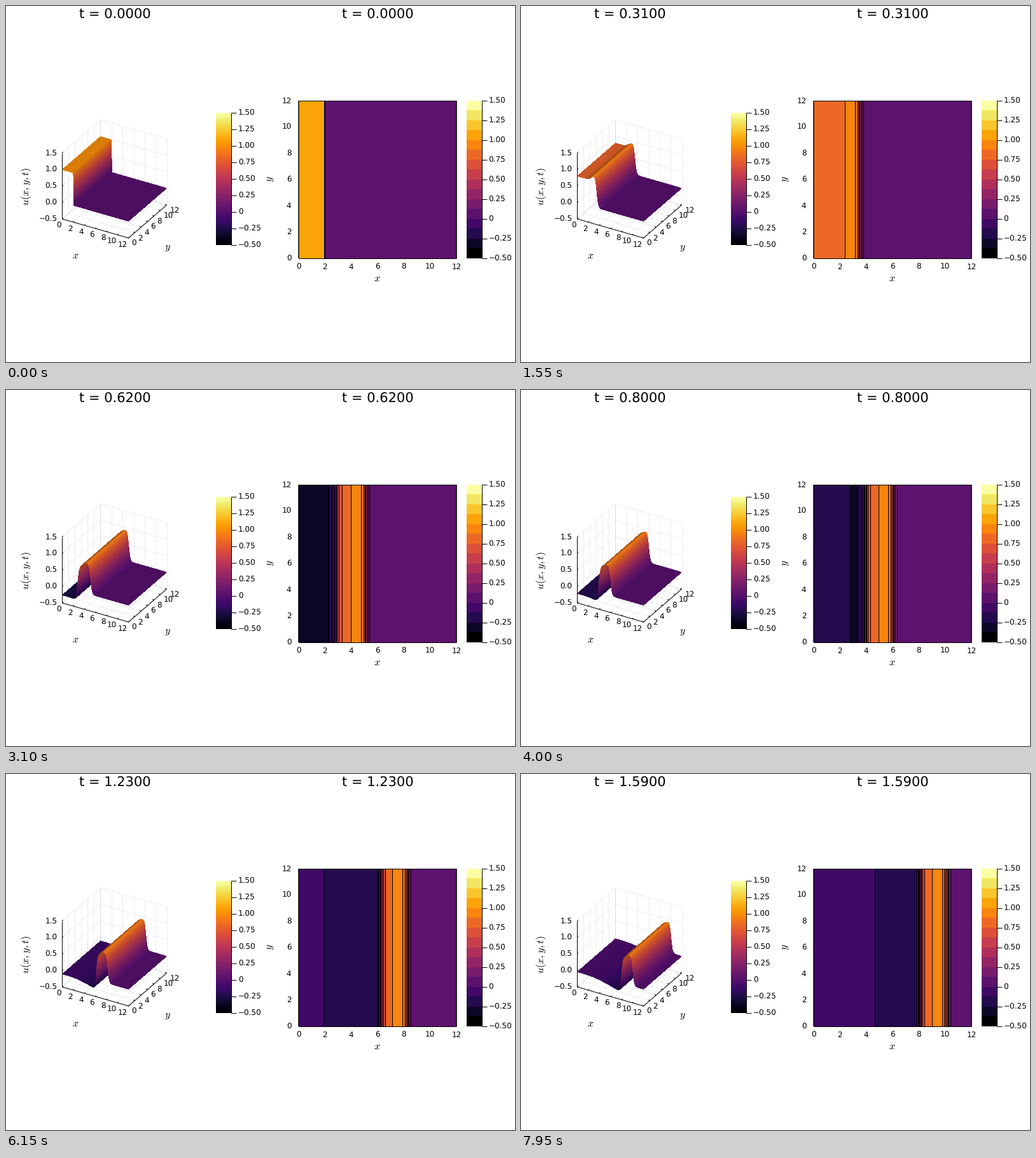
A matplotlib script that plays this animation: 800 by 560 pixels, repeating every 8000 ms.

```python
import numpy as np
import matplotlib.pyplot as plt
from matplotlib.animation import FuncAnimation
from matplotlib.collections import LineCollection, PolyCollection

plt.rcParams["font.family"] = "DejaVu Sans"
plt.rcParams["mathtext.fontset"] = "cm"
plt.rcParams["text.hinting"] = "no_hinting"
plt.rcParams["text.hinting_factor"] = 1

W, H, DPI = 800, 560, 100
FRAMES, STEP_MS = 160, 50
PX = 72 / DPI
SIZE = 12.0
LEVEL = 0.125
cmap = plt.get_cmap("inferno")
band_colors = cmap(np.arange(16) / 15)

# Excitable medium: u_t = u_xx + (u(1-u)(u-a) - v)/eps, v_t = b u - v
EPS, A, B = 0.01, 0.1, 0.5
DX, DT, SUB = 0.05, 0.0005, 20
xs = np.linspace(0, SIZE, 241)


def simulate():
    u = np.where(np.arange(xs.size) < 40, 1.0, 0.0)
    v = np.zeros_like(u)
    out = [u]
    for _ in range((FRAMES - 1) * SUB):
        p = np.pad(u, 1, mode="reflect")
        lap = (p[2:] - 2 * u + p[:-2]) / DX**2
        du = lap + (u * (1 - u) * (u - A) - v) / EPS
        u, v = u + DT * du, v + DT * (B * u - v)
        out.append(u)
    return out[::SUB]


waves = simulate()

fig = plt.figure(figsize=(W / DPI, H / DPI), dpi=DPI, facecolor="white")
ax = fig.add_axes([0, 0, 1, 1])
ax.axis("off")


def label(x, y, s, ha="center", size=8.5, **kw):
    return ax.text(x, y, s, ha=ha, va="baseline", fontsize=size, **kw)


def number(x, y, s, ha):
    label(x, y + 4.3, s.replace("-", "\u2212"), ha)


def math(x, y, s, rot=0):
    ax.text(x, y, s, ha="center", va="center", fontsize=11.7, rotation=rot)


def lines(segs, z, width=1.0, color="black", **kw):
    col = LineCollection(segs, colors=color, linewidths=width * PX, zorder=z, **kw)
    ax.add_collection(col)
    return col


# 3D box, orthographic
def proj(x, y, z):
    px = 88.4 + 104.2 * x / SIZE + 60 * y / SIZE
    py = 335 + 30 * x / SIZE - 52 * y / SIZE - 52 * (z + 0.5)
    return px, py


def seg(p, q):
    return [proj(*p), proj(*q)]


grid, ticks = [], []
for k in range(0, 13, 2):
    grid += [seg((k, 0, -0.5), (k, 12, -0.5)), seg((k, 12, -0.5), (k, 12, 1.5)),
             seg((0, k, -0.5), (12, k, -0.5)), seg((0, k, -0.5), (0, k, 1.5))]
    ticks += [seg((k, 0, -0.5), (k, 0.3, -0.5)), seg((12, k, -0.5), (11.7, k, -0.5))]
    px, py = proj(k, 0, -0.5)
    number(px - 1.3, py + 9.5, str(k), "right")
    px, py = proj(12, k, -0.5)
    number(px + 5, py + 8, str(k), "left")
for z in (-0.5, 0, 0.5, 1, 1.5):
    grid += [seg((0, 0, z), (0, 12, z)), seg((0, 12, z), (12, 12, z))]
    ticks.append(seg((0, 0, z), (0, 0.3, z)))
    number(80.5, proj(0, 0, z)[1], f"{z:.1f}", "right")
ticks += [seg((0, 0, -0.5), (0, 0, 1.5)), seg((0, 0, -0.5), (12, 0, -0.5)),
          seg((12, 0, -0.5), (12, 12, -0.5))]
lines(grid, 1, 0.7, "black", alpha=0.1)
lines(ticks, 2)
math(32, 284, "$u(x,y,t)$", 90)
math(109.5, 392, "$x$")
math(253.5, 380, "$y$")


# Colour bars
def colorbar(x, top, height, colors):
    ax.imshow(colors[::-1, None, :], extent=(x, x + 24, top + height, top),
              aspect="auto", interpolation="nearest", zorder=2)
    marks = [[(x + 24, top), (x + 24, top + height)]]
    for i in range(9):
        val, y = 1.5 - i / 4, top + height * i / 8
        marks.append([(x + 24, y), (x + 32, y)])
        number(x + 34.7, y, f"{val:.2f}" if val else "0", "left")
    lines(marks, 3)


colorbar(330.4, 168, 208, cmap(np.linspace(0, 1, 208)))
colorbar(724, 148.7, 248, band_colors)

# Contour panel
X0, X1, Y0, Y1 = 460, 708, 149, 397
for k in range(0, 13, 2):
    number(X0 + 248 * k / SIZE, 410, str(k), "center")
    number(448.5, Y1 - 0.5 - 248 * k / SIZE, str(k), "right")
math(583.5, 428, "$x$")
math(415, 272.5, "$y$", 90)
lines([[(X0, Y0), (X1, Y0)], [(X0, Y1), (X1, Y1)]], 5)
lines([[(X0, Y0), (X0, Y1)], [(X1, Y0), (X1, Y1)]], 5, 1.5)

fine = np.linspace(0, SIZE, 4961)
bands = ax.imshow(np.ones((1, fine.size, 4)), extent=(X0, X1, Y1, Y0),
                  aspect="auto", interpolation="nearest", zorder=3)
contours = lines([], 4)
surface = PolyCollection([], antialiased=False, linewidths=0.5, zorder=3)
ax.add_collection(surface)
titles = [label(x, 18.3, "", size=14.9) for x in (171, 584.3)]
ax.set_xlim(0, W)
ax.set_ylim(H, 0)

MIDDLE = np.array(proj(SIZE / 2, SIZE / 2, 0.5))


def edge(x, y, z):
    """One side of the sheet, drawn slightly smaller than its box."""
    pts = np.stack(proj(x, y, z), axis=1)
    return MIDDLE + 0.985 * (pts - MIDDLE)


def strips(u):
    """Quads from back to front with their shaded colours."""
    arc = np.r_[0, np.cumsum(np.hypot(np.diff(xs) / 6, np.diff(u)))]
    s = np.linspace(0, arc[-1], 280)
    x, z = np.interp(s, arc, xs), np.interp(s, arc, u)
    near, far = edge(x, 0 * x, z), edge(x, 0 * x + SIZE, z)
    quads = np.stack([near[:-1], near[1:], far[1:], far[:-1]], axis=1)
    dx, dz = np.diff(x) / SIZE, np.diff(z) / 2
    facing = np.abs(-0.433 * dz + 0.5 * dx) / np.hypot(dx, dz)
    col = cmap(((z[1:] + z[:-1]) / 2 + 0.5) / 2)
    col[:, :3] *= np.minimum(1, 0.6 + 0.54 * facing)[:, None]
    return quads, col


def draw(i):
    u = waves[i]
    quads, col = strips(u)
    surface.set_verts(quads)
    surface.set_facecolor(col)
    surface.set_edgecolor(col)

    idx = np.floor((np.interp(fine, xs, u) + 0.5) / LEVEL + 1e-9)
    idx = np.clip(idx, 0, 15).astype(int)
    bands.set_data(band_colors[idx][None])
    cuts = X0 + 248 * fine[np.flatnonzero(np.diff(idx))] / SIZE
    contours.set_segments([[(c, Y0), (c, Y1)] for c in cuts])

    for t in titles:
        t.set_text(f"t = {i * 0.01:.4f}")
    return [surface, bands, contours, *titles]


anim = FuncAnimation(fig, draw, frames=FRAMES, interval=STEP_MS,
                     repeat=True, repeat_delay=0, blit=False)
plt.show()
```
